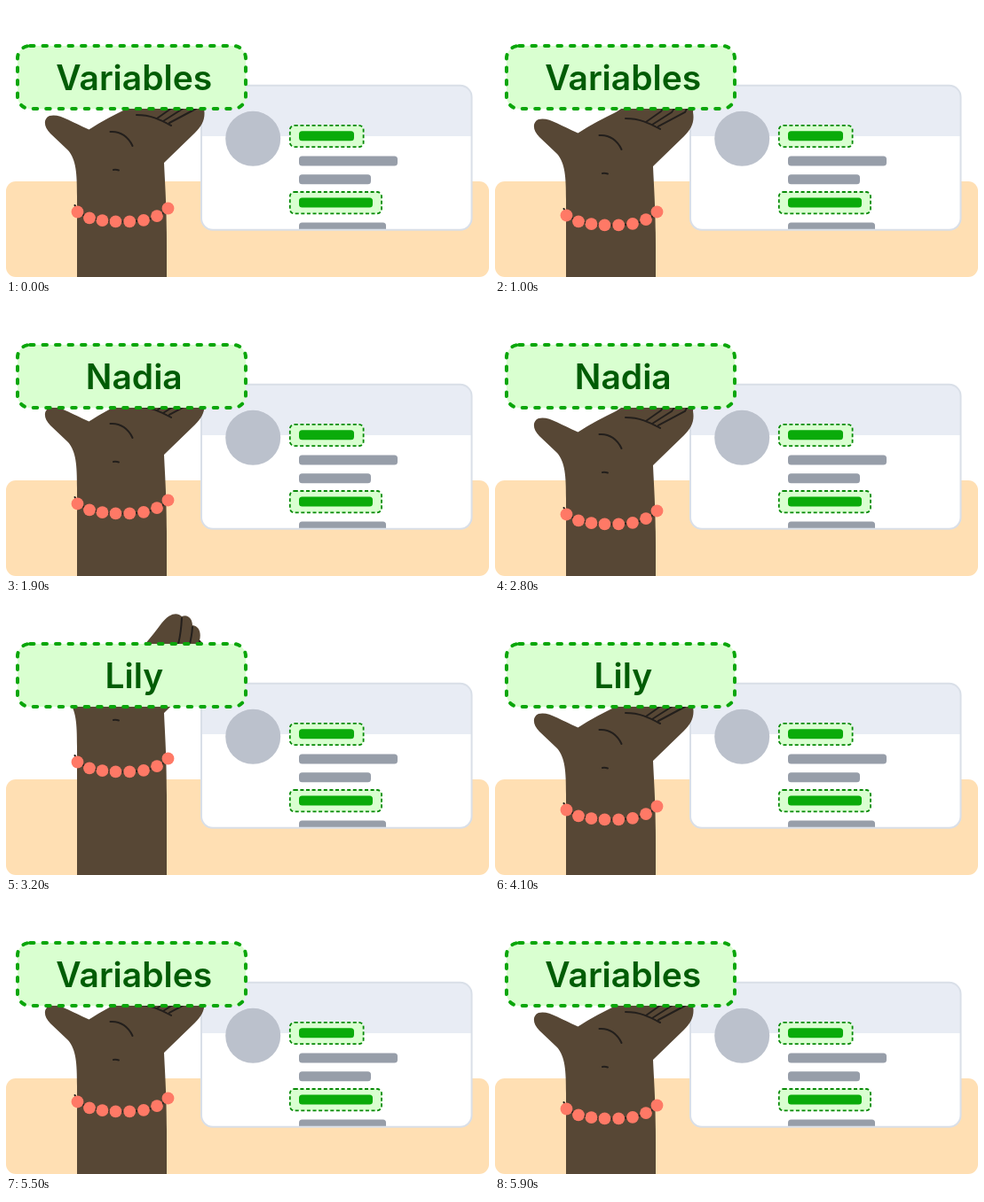
Write an HTML page that moves like this. It is 544x306 px and loops after 6 s.

```html
<!DOCTYPE html>
<html lang="en">
<head>
<meta charset="utf-8">
<title>Variables</title>
<style>
  html, body { margin: 0; width: 100%; height: 100%; overflow: hidden; background: #fff; }
  svg { display: block; width: 100%; height: 100%; }
  #label { font: 600 39px Inter, "Open Sans", sans-serif; fill: #005c05; text-anchor: middle; }
  .line { fill: none; stroke: #231f1c; stroke-width: 2; stroke-linecap: round; stroke-linejoin: round; }
  .slot { fill: #d9ffd0; stroke: #078a07; stroke-width: 1.8; stroke-dasharray: 4 2.6; }
</style>
</head>
<body>
<svg viewBox="0 0 544 306">
  <defs>
    <clipPath id="inside"><rect x="220" y="90" width="304.500" height="162.500" rx="13"/></clipPath>
  </defs>
  <rect y="198" width="544" height="108" rx="11" fill="#ffdfb3"/>

  <g clip-path="url(#inside)">
    <rect x="220" y="90" width="305" height="163" fill="#fff"/>
    <rect x="220" y="90" width="305" height="57" fill="#e8ecf4"/>
    <circle cx="278.200" cy="149.800" r="31" fill="#bbc1cc"/>
    <rect class="slot" x="319.800" y="134.800" width="82.800" height="24.400" rx="5"/>
    <rect class="slot" x="319.800" y="210" width="103.200" height="24.400" rx="5"/>
    <g id="bars"></g>
  </g>
  <rect x="220" y="89.800" width="304.500" height="163" rx="13" fill="none" stroke="#d9dfe8" stroke-width="2"/>

  <g id="hand">
    <path fill="#574735" d="M80 480V215C80 188 79 174 70 163L50 144C42 136 42 127 49 124
      C60 121 72 130 93.500 139.500C108 130 122 123 136 116C152 107 163 92 175 76
      C184 64 193 63 198 68C205 65 210 71 210 78C218 79 220 87 218 95
      C225 99 224 107 223 116C225 127 221 135 213 143L178 177C179 200 181 225 181 270V480Z"/>
    <path class="line" d="M147 123C163 123 173 128 186 135M170 127L187 115C194 106 197 88 198 70
      M177 130L199 116C206 107 209 93 210 80M184 132L214 116C218 110 218 102 218 96
      M117.500 142C129 141 138 148 142.500 158M121 185Q124 184.500 127 185.500"/>
    <path class="line" d="M77.500 225C82 236 94 243 128 243.500C160 244 176 238 183 228"/>
    <g id="beads" fill="#ff7966"></g>
  </g>

  <rect x="13" y="45" width="257" height="71" rx="14" fill="#d9ffd0" stroke="#0aa60a"
    stroke-width="4" stroke-linecap="round" stroke-dasharray="4.500 10"/>
  <text id="label" x="144.300" y="94.500"></text>
</svg>
<script>
const STEP = 100, LOOP = 6000, FIRST = 1000, CYCLE = 1800, LIFT = 54;
const words = ["Variables", "Nadia", "Lily"];
const byId = id => document.getElementById(id);
const hand = byId("hand"), label = byId("label");

function add(parent, tag, attrs) {
  const node = document.createElementNS("http://www.w3.org/2000/svg", tag);
  for (const key in attrs) node.setAttribute(key, attrs[key]);
  byId(parent).append(node);
}

const bar = (y, width, fill) => add("bars", "rect", { x: 330, y, width, height: 11, rx: 3.5, fill });
const green = "#0aab0a", grey = "#979ea9";
bar(141.3, 62, green);
bar(169.5, 111, grey);
bar(190.3, 81, grey);
bar(216.6, 83, green);
bar(244.5, 98, grey);

[[80.5, 232.5], [94, 239.3], [108.5, 242.2], [123.5, 243.3],
 [139.2, 243.3], [155, 241.8], [170, 237.2], [182.5, 228.5]]
  .forEach(([cx, cy]) => add("beads", "circle", { cx, cy, r: 6.9 }));

// Dips slightly before it accelerates to 1.
const back = (p, pull) => p * p * ((pull + 1) * p - pull);

function handOffset(t) {
  if (t < FIRST) return 0;
  const phase = (t - FIRST) % CYCLE;
  if (phase < 400) return -LIFT * back((phase + STEP) / 500, 2.56);
  if (phase < 900) return -LIFT;
  if (phase < 1300) return -LIFT * back(1 - (phase - 800) / 500, 2.84);
  return 0;
}

function draw(t) {
  hand.setAttribute("transform", `translate(0 ${handOffset(t).toFixed(2)})`);
  const word = words[Math.floor((t + 400) / CYCLE) % words.length];
  if (label.textContent !== word) label.textContent = word;
}

const start = performance.now();
function tick() {
  const t = (performance.now() - start) % LOOP;
  draw(Math.floor(t / STEP) * STEP);
  requestAnimationFrame(tick);
}
tick();
</script>
</body>
</html>
```
